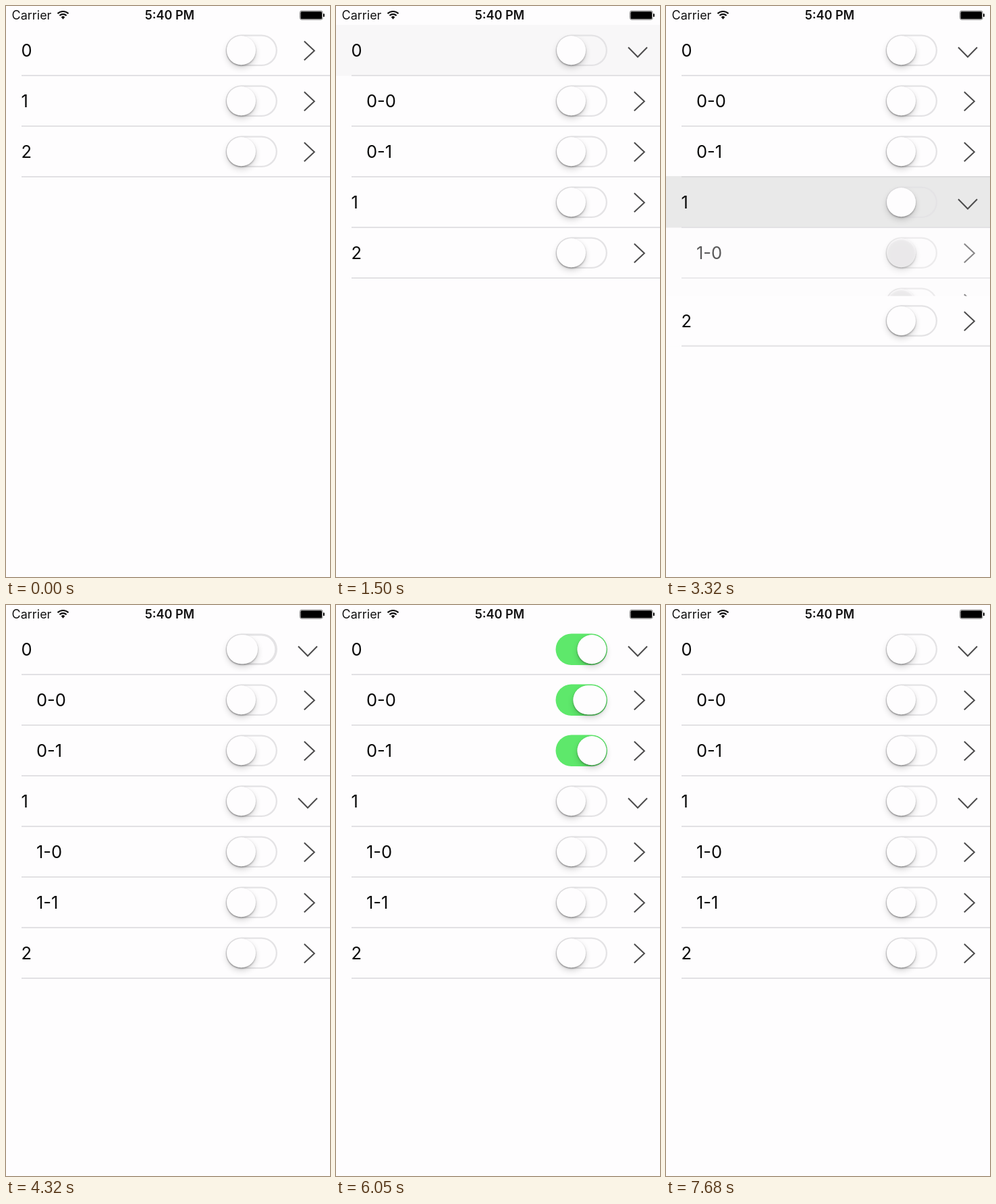
An HTML page with a canvas that plays this animation: 480x846 px, repeating every 8 s.

```html
<!DOCTYPE html>
<html lang="en">
<head>
<meta charset="utf-8">
<title>Expandable switch list</title>
<style>
  html, body { margin: 0; width: 100%; height: 100%; overflow: hidden; background: #fefdfe; }
  canvas { display: block; width: 100%; height: 100%; }
</style>
</head>
<body>
<canvas id="stage" width="480" height="846"></canvas>
<script>
const ctx = document.getElementById('stage').getContext('2d');
const LOOP = 8000, TOP = 28, ROW = 75;
const BG = '#fefdfe', FONT = 'Inter, Roboto, sans-serif';
const OFF = [228, 227, 229], ON = [94, 232, 107];

const OPEN_0 = 1140, OPEN_1 = 3090;       // row taps
const TAP_ALL = 4280, TAP_00 = 5970, TAP_01 = 7090;  // switch presses
const HOLD = 130, MOVE = 400;

const clamp = x => Math.min(1, Math.max(0, x));
const ramp = (t, from, len) => clamp((t - from) / len);
const ease = x => x * x * (3 - 2 * x);
const mix = (a, b, k) => a + (b - a) * k;

const opened = (t, tap) => ease(ramp(t, tap + 40, 310));
const flipped = (t, tap) => ease(ramp(t, tap + HOLD, MOVE));

function pressed(t, tap) {
  if (t < tap + 40) return 0;
  return ramp(t, tap, 120) * (1 - ease(ramp(t, tap + HOLD + 20, 220)));
}

function highlight(t, tap) {
  return t < tap ? 0 : 1 - ramp(t, tap + 45, 375);
}

function rowsAt(t) {
  const a = opened(t, OPEN_0), b = opened(t, OPEN_1);
  const on = flipped(t, TAP_ALL);
  const off0 = flipped(t, TAP_00), off1 = flipped(t, TAP_01);
  const p0 = pressed(t, TAP_ALL), p00 = pressed(t, TAP_00), p01 = pressed(t, TAP_01);
  const row = (label, slot, extra) =>
    ({ label, slot, alpha: 1, value: 0, press: 0, glow: 0, down: false, ...extra });
  // children first, so that the sliding rows cover them
  return [
    row('0-0', 1, { alpha: a, value: on - off0, press: p00 }),
    row('0-1', 2, { alpha: a, value: on - off1, press: p01 }),
    row('1-0', 4, { alpha: b }),
    row('1-1', 5, { alpha: b }),
    row('2', 2 + 2 * a + 2 * b),
    row('1', 1 + 2 * a, { glow: highlight(t, OPEN_1), down: t >= OPEN_1 + 40 }),
    row('0', 0, {
      value: on - off1, press: p0,
      glow: highlight(t, OPEN_0), down: t >= OPEN_0 + 40
    })
  ];
}

function pill(x, y, w, h) {
  ctx.roundRect(x, y, w, h, Math.min(w, h) / 2);
}

function line(points, width, color) {
  ctx.beginPath();
  points.forEach(([x, y]) => ctx.lineTo(x, y));
  ctx.lineWidth = width;
  ctx.strokeStyle = color;
  ctx.stroke();
}

function shadow(color, y, blur) {
  ctx.shadowColor = color;
  ctx.shadowOffsetY = y;
  ctx.shadowBlur = blur;
}

function drawSwitch(cy, value, press) {
  const cx = 363.75;
  const hole = (1 - value) * (1 - press ** 3);
  const w = 72 * hole, h = 42 * hole;
  ctx.beginPath();
  pill(cx - 38.25, cy - 23.25, 76.5, 46.5);
  if (hole > 0.01) pill(cx - w / 2, cy - h / 2, w, h);
  ctx.fillStyle = `rgb(${OFF.map((c, i) => Math.round(mix(c, ON[i], value)))})`;
  ctx.fill('evenodd');

  const kw = 43 + 9 * press;
  const kx = 327 + value * (73.5 - kw);
  ctx.save();
  ctx.fillStyle = BG;
  ctx.beginPath();
  pill(kx, cy - 21.5, kw, 43);
  shadow('rgba(0,0,0,.16)', 4.5, 10);
  ctx.fill();
  shadow('rgba(0,0,0,.3)', 1.5, 2.5);
  ctx.fill();
  ctx.restore();
}

function drawChevron(cy, down) {
  const points = down
    ? [[433, cy - 4.5], [447, cy + 9.8], [461, cy - 4.5]]
    : [[441.8, cy - 13.5], [456.8, cy + 0.5], [441.8, cy + 14.5]];
  line(points, 2, '#4c4b4c');
}

function drawRow(r) {
  const y = TOP + r.slot * ROW, cy = y + 37.75;
  const lit = r.glow === 1;
  ctx.save();
  ctx.globalAlpha = r.alpha;
  ctx.fillStyle = BG;
  ctx.fillRect(0, y + 1, 480, ROW);
  if (r.glow > 0) {
    ctx.globalAlpha = r.alpha * r.glow;
    ctx.fillStyle = '#d6d5d6';
    const top = r.slot > 0 ? y - 1 : y;
    ctx.fillRect(0, top, 480, y + ROW + 0.5 - top);
    ctx.globalAlpha = r.alpha;
  }
  if (!lit) {
    ctx.fillStyle = '#e2e1e4';
    ctx.fillRect(23, y + 74, 457, 2);
  }
  ctx.fillStyle = '#0a0a0a';
  ctx.font = `25.5px ${FONT}`;
  ctx.textAlign = 'left';
  ctx.fillText(r.label, r.label.length > 1 ? 45 : 22.5, y + 47);
  drawSwitch(cy, r.value, r.press);
  drawChevron(cy, r.down);
  ctx.restore();
}

function drawStatusBar() {
  ctx.fillStyle = BG;
  ctx.fillRect(0, 0, 480, TOP);
  ctx.fillStyle = '#111';
  ctx.textAlign = 'left';
  ctx.font = `18px ${FONT}`;
  ctx.fillText('Carrier', 8.5, 20.3);
  ctx.textAlign = 'center';
  ctx.font = `600 18px ${FONT}`;
  ctx.fillText('5:40 PM', 242.5, 20.3);

  // wifi
  const quarter = Math.PI / 4;
  ctx.strokeStyle = '#111';
  ctx.lineWidth = 2.2;
  for (const radius of [7.2, 11.3]) {
    ctx.beginPath();
    ctx.arc(84.5, 19.3, radius, -3 * quarter, -quarter);
    ctx.stroke();
  }
  ctx.beginPath();
  ctx.moveTo(84.5, 19.8);
  ctx.arc(84.5, 19.3, 4, -3 * quarter, -quarter);
  ctx.fill();

  // battery
  ctx.beginPath();
  ctx.roundRect(435.5, 7.2, 33.5, 13, 2.5);
  ctx.lineWidth = 1;
  ctx.strokeStyle = '#777';
  ctx.stroke();
  ctx.fillStyle = '#000';
  ctx.beginPath();
  ctx.roundRect(436.5, 8.2, 31.5, 11, 1.5);
  ctx.fill();
  ctx.beginPath();
  ctx.roundRect(470, 11.3, 1.8, 4.8, 0.9);
  ctx.fill();
}

function draw(t) {
  ctx.fillStyle = BG;
  ctx.fillRect(0, 0, 480, 846);
  rowsAt(t).forEach(drawRow);
  drawStatusBar();
}

const start = performance.now();
function tick(now) {
  draw(Math.max(0, now - start) % LOOP);
  requestAnimationFrame(tick);
}
draw(0);
requestAnimationFrame(tick);
</script>
</body>
</html>
```
